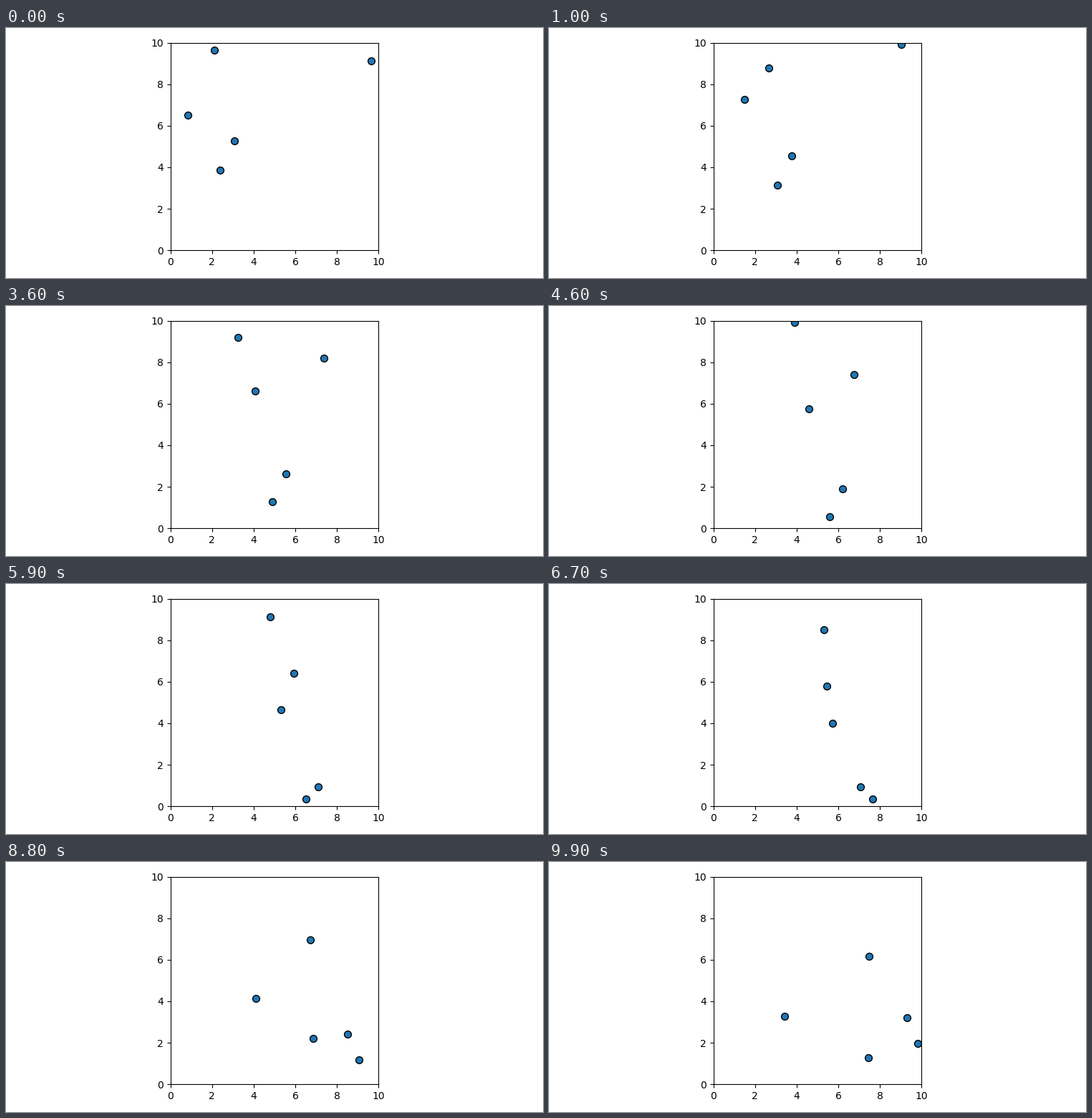
A matplotlib script that plays this animation: 750x350 px, repeating every 10 s.

```python
import numpy as np
import matplotlib.pyplot as plt
from matplotlib.animation import FuncAnimation

W, H, DPI = 750, 350, 100
FRAMES, INTERVAL = 100, 100
BOX = 10
SPEED = 0.1

# Start points and headings of the five balls
start = np.array([(0.819, 6.524), (2.1205, 9.635), (2.387, 3.859),
                  (3.088, 5.274), (9.6468, 9.129)])
heading = np.radians([47.83, -57.4, -45.81, -47.17, 128.92])
velocity = SPEED * np.column_stack([np.cos(heading), np.sin(heading)])


def positions(step):
    """Straight flight; a ball turns back once it has left the box."""
    pos, vel = start.copy(), velocity.copy()
    for _ in range(step):
        pos += vel
        vel[(pos < 0) | (pos > BOX)] *= -1
    return pos


fig = plt.figure(figsize=(W / DPI, H / DPI), dpi=DPI)
side = 290.5
ax = fig.add_axes([229.75 / W, 38.8 / H, side / W, side / H],
                  xlim=(0, BOX), ylim=(0, BOX))
ticks = range(0, BOX + 1, 2)
ax.set(xticks=ticks, yticks=ticks)
dots = ax.scatter(*start.T, s=50, color="C0", edgecolor="black", linewidth=1,
                  zorder=2)


def update(i):
    dots.set_offsets(positions(i))
    return dots,


anim = FuncAnimation(fig, update, frames=FRAMES, interval=INTERVAL,
                     repeat=True, repeat_delay=0)
plt.show()
```
